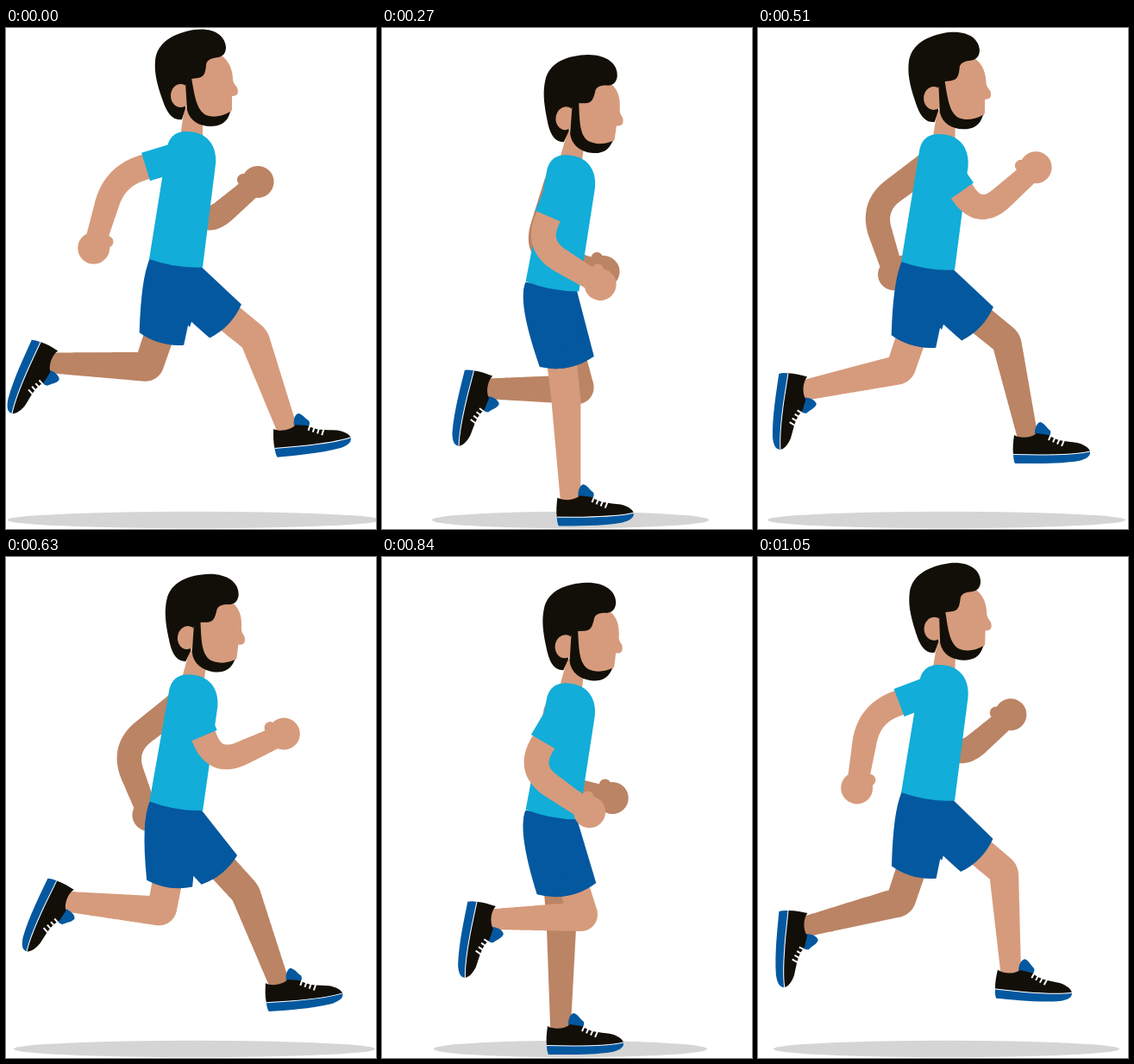
An HTML page with a canvas for the animation above (1.08 s loop, 429 px wide and 581 px high).

```html
<!DOCTYPE html>
<html lang="en">
<head>
<meta charset="utf-8">
<title>Runner</title>
<style>
html, body { margin: 0; width: 100%; height: 100%; overflow: hidden; background: #fff; }
canvas { display: block; width: 429px; height: 581px; }
</style>
</head>
<body>
<canvas id="stage"></canvas>
<script>
const W = 429, H = 581;
const STEP = 30, STEPS = 36;
const CYCLE = 37, HALF = CYCLE / 2;
const HIP = { x: 200.5, y: 289 };
const RAD = Math.PI / 180;

const SKIN = '#d69b7c', SKIN_FAR = '#bb8464', SHIRT = '#12add8';
const BLUE = '#04589f', BLACK = '#120f08', SHADOW = '#d5d5d5';

// phase, drop, torso tilt, head tilt, shadow radius (one step of the run)
const BODY = [
  [0, 0, 0, 0, 217], [5, 34, 2, 15.4, 197], [5.5, 34.5, 2, 16, 186],
  [9.5, 26, 1.6, 7, 158.5], [13, 18, 0.9, 4.3, 158.5],
  [16.5, 5, 0.2, 1.5, 200.5], [17, 3, 0.2, 0.8, 207.5]
];

// phase, knee x y, ankle x y (from the hip), foot angle
const LEG = [
  [0, 87.5, 71, 124.5, 173.5, -6], [5, 61.5, 97, 98.5, 202, -2],
  [5.5, 53.5, 99.5, 88.5, 206.5, -1], [9.5, 7.5, 115, 6.5, 228, 0],
  [13, -20.5, 113, -78.5, 208, 15], [16.5, -35.5, 106, -143.5, 134, 95],
  [17, -35.5, 104, -144.5, 127.5, 98], [18.5, -35.5, 104, -145.5, 99.5, 114],
  [23.5, -3.5, 105, -108, 93, 113], [24, -2.5, 104.5, -105.5, 93.5, 112],
  [28, 33.5, 102, -70.5, 105, 101], [31.5, 61.5, 86, -28.5, 143, 69],
  [35, 84.5, 71, 92.5, 185, 5], [35.5, 87.5, 71, 111.5, 179, 0]
].map(([p, kx, ky, ax, ay, foot]) =>
  [p, ...polar(kx, ky), ...polar(ax - kx, ay - ky), foot]);

// phase, upper arm angle, forearm angle
const ARM_NEAR = [
  [0, 163, 106.7], [5, 146.3, 71.4], [13, 78, -10], [17, 55, -41.8],
  [24, 84, -3.3], [28, 120.5, 34.4], [35, 159.3, 99.5]
];
const ARM_FAR = [
  [5.5, 135, 58], [9.5, 101.5, 12], [16.5, 68.5, -41], [18.5, 69, -40.6],
  [23.5, 79.4, -25.6], [31.5, 137, 57], [35.5, 143.6, 72]
];

const ART = {
  torso: 'M166,268 L187,137 Q191,121 207,120 C232,119 245,135 243,158 L228,277.5 Q197,279 166,268Z',
  neck: 'M207,92 L202,126 L228,126 L228,100Z',
  face: 'M208,60 L230,35 L250,32 C258,38 262,46 263,58 C263,64 266,66 268,69 C270,75 269,79 262,79 L262,95 C255,110 230,112 209,98Z',
  hair: 'M204,106 C191,108 185,94 181,82 C174,62 172,50 173,38 C175,16 195,6 218,2 C240,-1 254,8 255,22 C255,30 251,33 246,34 C236,35 232,38 232,44 C231,52 230,57 222,58 L215,59 L208,65 L208,93Z',
  beard: 'M208,63 L210,95 C213,108 225,114 237,114 C248,114 257,110 260,97 C250,103 240,104 232,101 C221,95 219,80 215,58Z',
  tongue: 'M9,-1 C9,-9 12,-13 15,-14 C20,-13 22,-8 27,-4 L28,6 L12,5Z',
  upper: 'M-15,1 C-9,5 4,5 11,-1 L25,1 C34,8 44,8 58,10 C66,12 72,16 73,20 C62,23 40,24 15,24 L-16,24 C-17,16 -16,8 -15,1Z',
  sole: 'M-16,23 L15,24 C40,24 60,23 73,20 C74,26 68,29 60,31 C35,35 5,34 -14,34 Q-16,30 -16,23Z',
  seam: 'M-16,23.5 L15,24 C40,24 60,23 73,20'
};
for (const name in ART) ART[name] = new Path2D(ART[name]);

const canvas = document.getElementById('stage');
const ctx = canvas.getContext('2d');
const scale = window.devicePixelRatio || 1;
canvas.width = Math.round(W * scale);
canvas.height = Math.round(H * scale);

function polar(x, y) {
  const a = Math.atan2(y, x) / RAD;
  return [a < -60 ? a + 360 : a, Math.hypot(x, y)];
}

function reach(from, angle, len) {
  return { x: from.x + len * Math.cos(angle * RAD), y: from.y + len * Math.sin(angle * RAD) };
}

function mix(a, b, t) {
  return { x: a.x + (b.x - a.x) * t, y: a.y + (b.y - a.y) * t };
}

// Smooth periodic curve through the keys
function sample(keys, period, phase) {
  const n = keys.length, x = phase % period;
  const key = i => keys[(i + n) % n];
  const time = i => key(i)[0] + period * Math.floor(i / n);
  let i = -1;
  while (time(i + 1) <= x) i++;
  const h = time(i + 1) - time(i), u = (x - time(i)) / h;
  const slope = (j, c) => (key(j + 1)[c] - key(j - 1)[c]) / (time(j + 1) - time(j - 1));
  const u2 = u * u, u3 = u2 * u;
  return key(i).slice(1).map((a, k) => {
    const c = k + 1, b = key(i + 1)[c];
    return a + (b - a) * (3 * u2 - 2 * u3) +
      h * (slope(i, c) * (u3 - 2 * u2 + u) + slope(i + 1, c) * (u3 - u2));
  });
}

function fill(color, path) {
  ctx.fillStyle = color;
  path ? ctx.fill(path) : ctx.fill();
}

function disc(x, y, r) {
  ctx.moveTo(x + r, y);
  ctx.arc(x, y, r, 0, 7);
}

function placed(p, angle, draw) {
  ctx.save();
  ctx.translate(p.x, p.y);
  ctx.rotate(angle * RAD);
  draw();
  ctx.restore();
}

// Tapered limb a-b-c, its joint rounded by the share "bend"
function limb(a, b, c, radii, bend, color) {
  const p = mix(b, a, bend), q = mix(b, c, bend), N = 44;
  const [ra, rb, rc] = radii;
  ctx.beginPath();
  for (let i = 0; i <= N; i++) {
    const t = i / N;
    const s = mix(a, p, t), e = mix(q, c, t);
    const m = mix(mix(p, b, t), mix(b, q, t), t);
    const cut = bend / 2;
    disc(s.x, s.y, ra + (rb - ra) * t * (1 - cut));
    disc(m.x, m.y, rb + (ra - rb) * cut * (1 - t) + (rc - rb) * cut * t);
    disc(e.x, e.y, rb + (rc - rb) * (cut + (1 - cut) * t));
  }
  fill(color);
}

function shoe(ankle, angle) {
  placed(ankle, angle, () => {
    fill(BLUE, ART.tongue);
    fill(BLACK, ART.upper);
    fill(BLUE, ART.sole);
    ctx.strokeStyle = '#fff';
    ctx.lineWidth = 1;
    ctx.stroke(ART.seam);
    ctx.lineWidth = 2;
    ctx.beginPath();
    for (let i = 0; i < 4; i++) {
      ctx.moveTo(28.5 + 5 * i, -1 + 2.3 * i);
      ctx.lineTo(25 + 5 * i, 7 + 2.3 * i);
    }
    ctx.stroke();
  });
}

function leg(hip, pose, color) {
  const [thigh, thighLen, shin, shinLen, foot] = pose;
  const knee = reach(hip, thigh, thighLen);
  const ankle = reach(knee, shin, shinLen);
  limb(hip, knee, ankle, [18, 17, 12], 0.04, color);
  shoe(ankle, foot);
}

function shorts(hip, thighs) {
  placed(hip, 0, () => {
    for (const thigh of thighs) {
      const hem = (thigh + 9.5) / 1.12, left = reach({ x: 0, y: 0 }, hem + 19.8, 79);
      ctx.beginPath();
      ctx.moveTo(-34, -21);
      ctx.quadraticCurveTo(-44, 2, left.x, left.y);
      ctx.arc(0, 0, 79, (hem + 19.8) * RAD, (hem - 19.8) * RAD, true);
      ctx.lineTo(25, -13);
      ctx.closePath();
      fill(BLUE);
    }
    ctx.beginPath();
    ctx.moveTo(-20, 20);
    ctx.lineTo(12.5, 58);
    ctx.lineTo(25, 20);
    fill(BLUE);
  });
}

function arm(shoulder, [upper, fore], upperLen, foreLen, color) {
  const elbow = reach(shoulder, upper, upperLen);
  const hand = reach(elbow, fore, foreLen);
  limb(shoulder, elbow, hand, [15.5, 14.5, 12], 0.38, color);
  placed(hand, fore, () => {
    ctx.beginPath();
    disc(0, 0, 18.5);
    disc(-11.5, -13, 7);
    fill(color);
  });
}

function sleeve(shoulder, angle) {
  placed(shoulder, angle, () => {
    ctx.beginPath();
    disc(0, 0, 17);
    ctx.rect(0, -17, 48, 34);
    fill(SHIRT);
  });
}

function torso(hip, tilt, nod) {
  placed(hip, tilt, () => {
    ctx.translate(-HIP.x, -HIP.y);
    placed({ x: 215, y: 118 }, nod - tilt, () => {
      ctx.translate(-215, -118);
      fill(SKIN, ART.neck);
      fill(SKIN, ART.face);
      fill(BLACK, ART.hair);
      ctx.beginPath();
      ctx.ellipse(202.5, 78.5, 11.5, 13.5, 0, 0, 7);
      fill(SKIN);
      fill(BLACK, ART.beard);
    });
    fill(SHIRT, ART.torso);
  });
}

function draw(phase) {
  const [drop, tilt, nod, spread] = sample(BODY, HALF, phase);
  const hip = { x: HIP.x, y: HIP.y + drop };
  const onTorso = (x, y) => {
    const [a, r] = polar(x - HIP.x, y - HIP.y);
    return reach(hip, a + tilt, r);
  };
  const near = sample(LEG, CYCLE, phase);
  const far = sample(LEG, CYCLE, phase + HALF);
  const armNear = sample(ARM_NEAR, CYCLE, phase);
  const armFar = sample(ARM_FAR, CYCLE, phase + HALF);
  const shoulder = onTorso(208, 147);

  ctx.setTransform(scale, 0, 0, scale, 0, 0);
  ctx.fillStyle = '#fff';
  ctx.fillRect(0, 0, W, H);
  ctx.beginPath();
  ctx.ellipse(218.5, 570.5, spread, 9.7, 0, 0, 7);
  fill(SHADOW);

  arm(onTorso(199, 154), armFar, 84, 83, SKIN_FAR);
  leg(hip, far, SKIN_FAR);
  leg(hip, near, SKIN);
  shorts(hip, [far[0], near[0]]);
  torso(hip, tilt, nod);
  arm(shoulder, armNear, 85, 87, SKIN);
  sleeve(shoulder, armNear[0]);
}

const start = performance.now();
function tick() {
  const t = Math.max(0, performance.now() - start);
  draw(Math.floor(t / STEP) % STEPS);
  requestAnimationFrame(tick);
}
tick();
</script>
</body>
</html>
```
